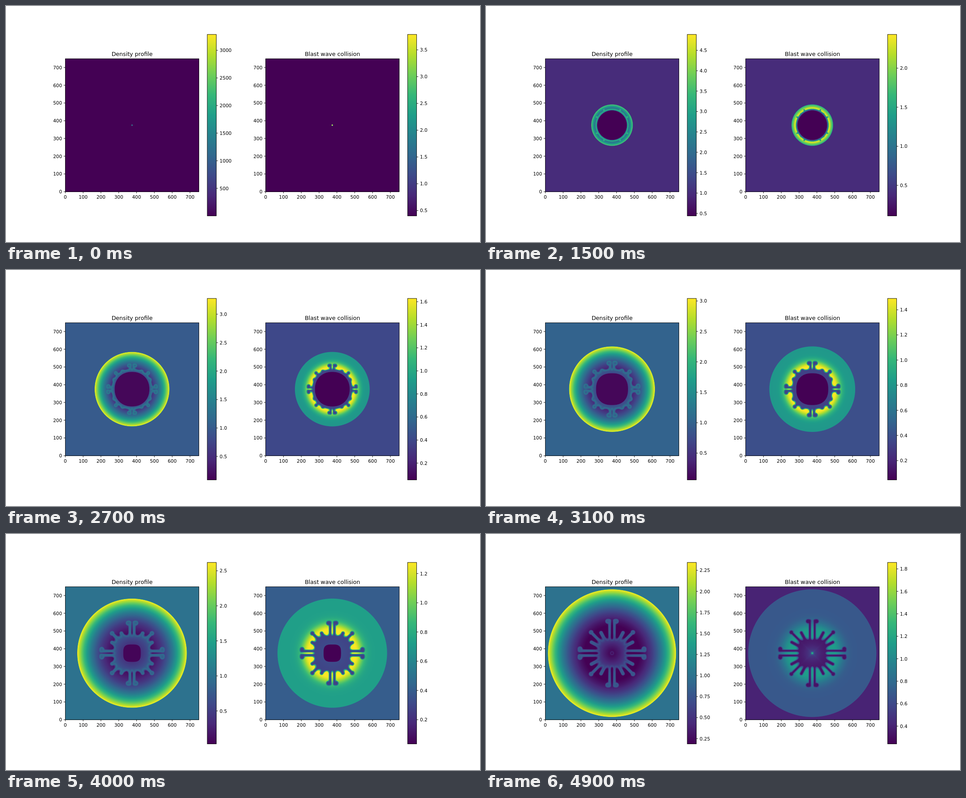
Recreate the animation shown at these times as an HTML page with a canvas. Size 1058 px wide and 529 px high, loop 5 s.

```html
<!DOCTYPE html>
<html lang="en">
<head>
<meta charset="utf-8">
<title>Blast wave</title>
<style>
  html, body { margin: 0; width: 100%; height: 100%; overflow: hidden; background: #fff; }
  canvas { display: block; }
</style>
</head>
<body>
<canvas id="stage" width="1058" height="529"></canvas>
<script>
const ctx = document.getElementById('stage').getContext('2d');
const SIZE = 299, MID_X = 148.8, MID_Y = 148.6, TOP = 118;
const BAR_TOP = 63.8, BAR_W = 20.2, BAR_H = 406.7;
const TICK = 298.2 / 7.5;

const mix = (a, b, f) => a + (b - a) * f;
const clamp = v => Math.min(1, Math.max(0, v));
const norm = (x, y, p) => p === 2 ? Math.hypot(x, y) : (x ** p + y ** p) ** (1 / p);

// Lengths in pixels; n counts steps of 100 ms.
function stateAt(n) {
  const rebound = clamp((n - 44) / 2);          // the reverse shock meets the centre
  const age = n - .28 * Math.max(0, n - 44);
  const thin = 1 / (n * n);                     // dilution of the expanding gas
  const lag = Math.max(0, 48 - age) ** 1.6;     // how far the fingers still have to grow
  const square = clamp((age - 20) / 24) ** 2;
  const front = 1 / (.1459 + .0059 * age);
  const heat = Math.min(3.787, .49 + 33 / (n + 2));
  const spot = rebound * (.72 + .1 * (49 - n));
  const top0 = Math.min(3287, Math.max(front, 1100 * thin));
  return {
    n, spot, rebound,
    shock: Math.max(1.5, 3.09 * age - .013 * Math.max(0, age - 30) ** 2),
    reverse: Math.min(2.25 * n, 39.5 - .078 * (n - 24) ** 2) * (1 - rebound),
    revPow: 2 + 1.8 * square,
    body: Math.max(.8, Math.min(2.45 * n, 44.5 - .042 * (age - 29) ** 2)),
    bodyPow: 2 + 2.5 * square,
    width: 3.2 * clamp((age - 8) / 25),
    tip: 73 - .143 * lag,
    offset: 2 + .14 * age,
    side: 52 - .05 * lag,
    diag: 66 - .114 * lag,
    range0: [Math.min(1, .44 * (15 / n) ** 2.75) + .17 * rebound, top0],
    peak: Math.min(3.8, front),
    edge: Math.min(top0, .65 + 900 * thin),
    deep: Math.min(top0, .6 + 170 * thin),
    core: Math.min(top0, 100 * thin),
    range1: [Math.min(.4, .109 * (15 / n) ** 1.18) + .215 * rebound, heat + spot],
    outer: Math.min(heat, .6 + 210 * thin),
    inner: heat,
    shell: Math.min(heat, .2 + 130 * thin) + .07 * rebound,
    glow: .28 * clamp((age - 30) / 14)
  };
}

// Viridis lookup
const STOPS = ['440154', '482878', '3e4989', '31688e', '26828e',
               '1f9e89', '35b779', '6ece58', 'b5de2b', 'fde725'];
const RGB = STOPS.map(h => [0, 2, 4].map(i => parseInt(h.slice(i, i + 2), 16)));
const LUT = Array.from({ length: 256 }, (_, i) => {
  const p = i / 255 * 9, k = Math.min(8, Math.floor(p));
  return RGB[k].map((c, j) => Math.round(mix(c, RGB[k + 1][j], p - k)));
});

function segment(x, y, ax, ay, bx, by) {
  const dx = bx - ax, dy = by - ay;
  const f = clamp(((x - ax) * dx + (y - ay) * dy) / (dx * dx + dy * dy || 1));
  return Math.hypot(x - ax - dx * f, y - ay - dy * f);
}

function blend(a, b, k) {
  const h = Math.max(k - Math.abs(a - b), 0) / k;
  return Math.min(a, b) - h * h * k / 4;
}

// Distance to a finger that leaves the centre at an angle
function spoke(x, y, angle, from, to) {
  const c = Math.cos(angle), s = Math.sin(angle);
  return segment(x, y, from * c, from * s, to * c, to * s);
}

// Signed distance to the contact surface, inside one folded octant
function contact(x, y, s) {
  const w = s.width, b = s.body, body = norm(x, y, s.bodyPow) - b;
  if (w < .3) return body;
  const stemY = s.offset * .62;
  const stem = segment(x, y, b - 5, stemY, s.tip, stemY) - w * .8;
  const head = Math.hypot(x - s.tip + 1.5, y - s.offset - 1) - w * 1.5;
  const side = spoke(x, y, .49, b * .9, s.side) - w * 1.1;
  const diag = spoke(x, y, Math.PI / 4, b * .9, s.diag) - w * .9;
  const knob = spoke(x, y, Math.PI / 4, s.diag, s.diag) - w * 1.4;
  return [blend(stem, head, w), side, Math.min(diag, knob)]
    .reduce((d, finger) => blend(d, finger, w * 2), body);
}

// Each field gives the values of the shocked shell, the inner gas, the core and the rest.
function density(x, y, r, d, s) {
  const wave = s.peak * (r / s.shock) ** 3;
  const fade = mix(1, Math.min(1, .25 + r / 60), clamp((s.n - 27) / 8));
  const gas = s.deep * fade + (s.edge - s.deep) * Math.exp(Math.min(d, 0) / 2)
    + s.spot * .25 * Math.exp(-((r - 3) ** 2) / 3);
  return [wave, gas, s.core, 1];
}

function collision(x, y, r, d, s) {
  const far = Math.max(0, r - (s.body + s.diag) / 2) / (.15 * s.shock);
  const wave = mix(s.outer, s.inner, Math.exp(-far * far));
  const cross = .1 * s.spot * Math.exp(-(x - y) / 2 - r / 18);
  const gas = s.shell + s.glow * Math.exp(-r / 14) + cross + s.spot * Math.exp(-r * r / 6);
  return [wave, gas, s.range1[s.n ? 0 : 1], .4];
}

const images = [0, 1].map(() => ctx.createImageData(SIZE, SIZE));

function paintFields(s) {
  const ranges = [s.range0, s.range1];
  for (let j = 0, at = 0; j < SIZE; j++) {
    for (let i = 0; i < SIZE; i++, at += 4) {
      const ax = Math.abs(i - MID_X), ay = Math.abs(j - MID_Y);
      const x = Math.max(ax, ay), y = Math.min(ax, ay), r = Math.hypot(x, y);
      const inShock = clamp(s.shock - r + .5);
      let d = 99, inGas = 0, inCore = 0;
      if (inShock) {
        d = contact(x, y, s);
        inGas = clamp(.5 - d / 3);
        inCore = s.reverse ? clamp(s.reverse - norm(x, y, s.revPow) + .5) : 0;
      }
      [density, collision].forEach((field, k) => {
        const [wave, gas, core, rest] = field(x, y, r, d, s);
        let v = rest;
        if (inShock) v = mix(rest, mix(wave, gas, inGas), inShock);
        if (inCore) v = mix(v, core, inCore);
        const [lo, hi] = ranges[k];
        const c = LUT[Math.round(clamp((v - lo) / (hi - lo)) * 255)];
        images[k].data.set([...c, 255], at);
      });
    }
  }
}

function line(x1, y1, x2, y2) {
  ctx.beginPath();
  ctx.moveTo(x1, y1);
  ctx.lineTo(x2, y2);
  ctx.stroke();
}

function label(text, x, y, align, size = 10.5) {
  ctx.font = size + 'px "DejaVu Sans", sans-serif';
  ctx.textAlign = align;
  ctx.fillText(text, x, y);
}

function tickStep(range) {
  for (let unit = .01; ; unit *= 10)
    for (const m of [1, 2, 2.5, 5])
      if (range / (m * unit) <= 9) return +(m * unit).toPrecision(3);
}

function drawBar(x, [lo, hi]) {
  const g = ctx.createLinearGradient(0, BAR_TOP + BAR_H, 0, BAR_TOP);
  STOPS.forEach((c, i) => g.addColorStop(i / 9, '#' + c));
  ctx.fillStyle = g;
  ctx.fillRect(x, BAR_TOP, BAR_W, BAR_H);
  ctx.strokeRect(x, BAR_TOP, BAR_W, BAR_H);
  ctx.fillStyle = '#000';
  const gap = tickStep(hi - lo);
  const digits = (String(gap).split('.')[1] || '').length;
  for (let k = Math.ceil(lo / gap); k * gap <= hi; k++) {
    const y = BAR_TOP + BAR_H * (hi - k * gap) / (hi - lo);
    line(x + BAR_W, y, x + BAR_W + 3.7, y);
    label((k * gap).toFixed(digits), x + BAR_W + 7.4, y + 4, 'left');
  }
}

function drawPanel(k, title, range) {
  const left = 132.4 + k * 447.2, bottom = 416.2;
  ctx.putImageData(images[k], Math.floor(left), TOP);
  ctx.strokeStyle = ctx.fillStyle = '#000';
  ctx.lineWidth = .9;
  ctx.strokeRect(left, TOP + .2, 298.2, 298);
  for (let i = 0; i < 8; i++) {
    const x = left + i * TICK, y = bottom - i * TICK;
    line(x, bottom, x, bottom + 3.7);
    line(left - 3.7, y, left, y);
    label(i * 100, x, bottom + 15.3, 'center');
    label(i * 100, left - 7.2, y + 4, 'right');
  }
  label(title, left + 149.1, 111.6, 'center', 12.6);
  drawBar(left + 316.8, range);
}

let shown = -1;
function tick(now) {
  const step = Math.floor(now % 5000 / 100);
  if (step !== shown) {
    shown = step;
    const s = stateAt(step);
    paintFields(s);
    ctx.fillStyle = '#fff';
    ctx.fillRect(0, 0, 1058, 529);
    drawPanel(0, 'Density profile', s.range0);
    drawPanel(1, 'Blast wave collision', s.range1);
  }
  requestAnimationFrame(tick);
}
tick(0);
</script>
</body>
</html>
```
